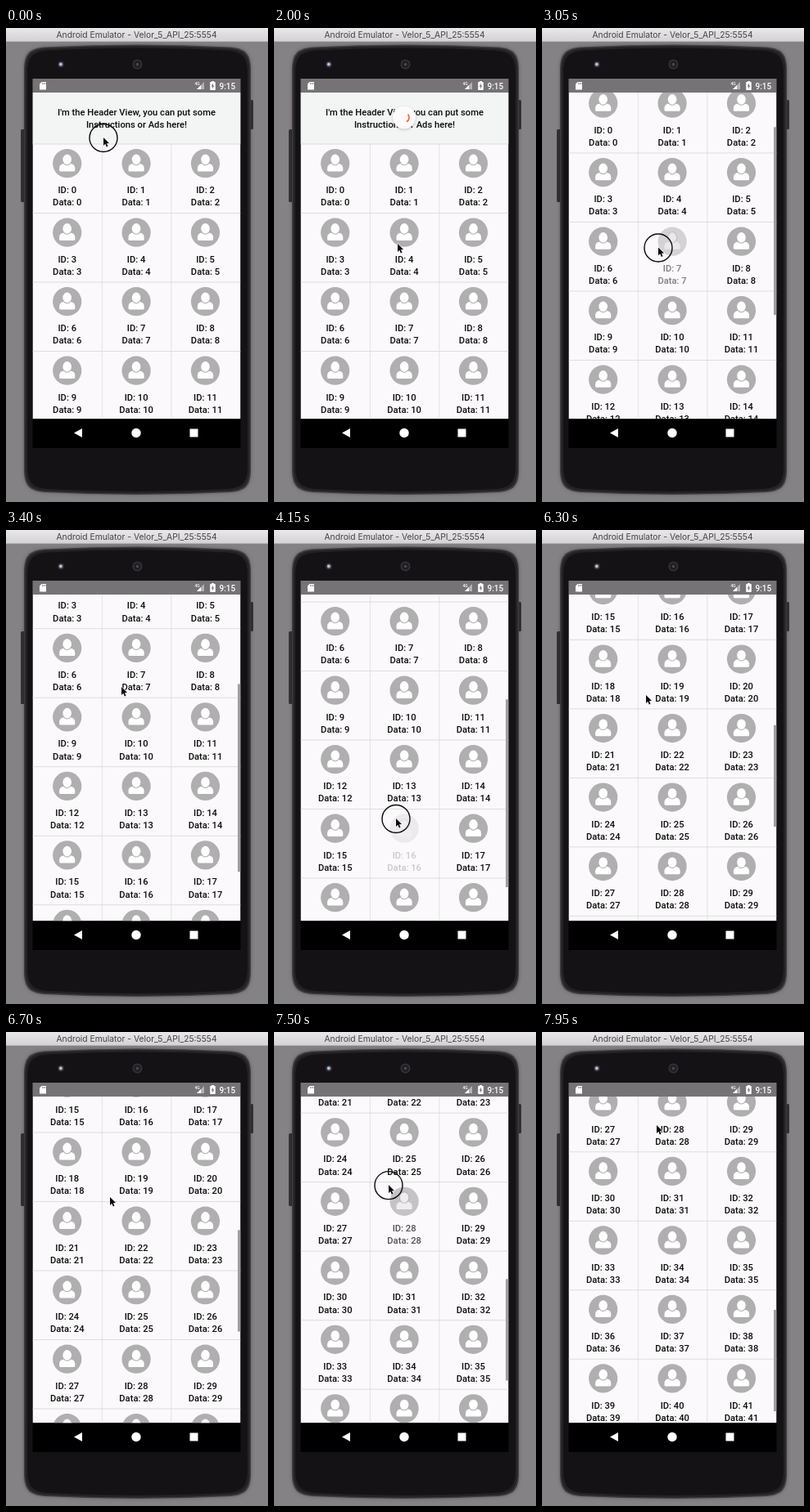
Animation of 320x580 px, one loop 8000 ms. Source, as an HTML page with a canvas:

```html
<!DOCTYPE html>
<html lang="en">
<head>
<meta charset="utf-8">
<title>Grid list demo</title>
<style>
html, body { margin: 0; width: 100%; height: 100%; overflow: hidden; background: #848284; }
canvas { display: block; width: 320px; height: 580px; }
</style>
</head>
<body>
<canvas id="stage"></canvas>
<script>
const W = 320, H = 580, LOOP = 8000;
const LIST = { x: 32.5, y: 79, w: 254, h: 399.5 };
const HEADER = 63, ROW = 84.5, COL = 84.4, FOOTER = 40;
const FONT = '500 11.2px Roboto, sans-serif';
const INK = '#0c0c0c', GREY = '#b0aeb0';
const FLING = 600, TRAVEL = 350, HOVER = 100, SLOP = 100;
const LOADED = 5250;
const REFRESH = { end: 2350, cycle: 1332, colors: ['dimgray', 'tomato', 'limegreen'] };

// Each drag: finger down, start of movement, finger up, and the offset the fling ends at.
const DRAGS = [
  { down: 0, move: 40, up: 430, from: [119, 134], to: [151, 264], rest: 0, pull: true },
  { down: 2750, move: 2850, up: 3260, from: [143, 342], to: [141, 192], rest: 223 },
  { down: 4000, move: 4170, up: 4450, from: [149, 353], to: [146, 283], rest: 293 },
  { down: 5650, move: 5740, up: 6060, from: [136, 382], to: [127, 202], rest: 526 },
  { down: 7170, move: 7240, up: 7600, from: [140, 380], to: [140, 114], rest: 844 }
];
const PULL = DRAGS[0];

const canvas = document.getElementById('stage');
const c = canvas.getContext('2d');
const dpr = window.devicePixelRatio || 1;
canvas.width = W * dpr;
canvas.height = H * dpr;

const TAU = Math.PI * 2;
const clamp = (v, a = 0, b = 1) => Math.min(b, Math.max(a, v));
const mix = (a, b, k) => a + (b - a) * k;
const smooth = k => k * k * (3 - 2 * k);
const out = k => 1 - (1 - k) ** 3;
const span = (t, a, b) => clamp((t - a) / (b - a));
const between = (p, q, k) => [mix(p[0], q[0], k), mix(p[1], q[1], k)];

// Offset at the start of each drag and the item under the finger.
DRAGS.forEach((d, i) => {
  d.base = i ? DRAGS[i - 1].rest : 0;
  const row = Math.floor((d.from[1] - LIST.y - HEADER + d.base) / ROW);
  d.item = row * 3 + Math.floor((d.from[0] - LIST.x) / COL);
});

const lastDrag = t => DRAGS.filter(d => d.down <= t).pop();
const isDown = t => t < lastDrag(t).up;

function pointerAt(t) {
  const d = lastDrag(t);
  const next = DRAGS[DRAGS.indexOf(d) + 1];
  if (t < d.up || !next) return between(d.from, d.to, span(t, d.move, d.up));
  const arrive = next.down - HOVER;
  return between(d.to, next.from, smooth(span(t, arrive - TRAVEL, arrive)));
}

function scrollAt(t) {
  const d = lastDrag(t);
  if (d.pull) return 0;
  const dragged = d.base + (d.from[1] - d.to[1]) * span(t, d.move, d.up);
  return mix(dragged, d.rest, out(span(t, d.up, d.up + FLING)));
}

function itemAlpha(id, t) {
  const d = lastDrag(t);
  if (d.item !== id) return 1;
  const cancel = d.move + SLOP;
  return t < cancel ? mix(1, 0.2, span(t, d.down, d.down + 150)) : mix(0.2, 1, span(t, cancel, cancel + 250));
}

function rect(x, y, w, h, fill) {
  c.fillStyle = fill;
  c.fillRect(x, y, w, h);
}
function round(x, y, w, h, r, fill) {
  c.beginPath();
  c.roundRect(x, y, w, h, r);
  c.fillStyle = fill;
  c.fill();
}
function disc(x, y, r, fill) {
  c.beginPath();
  c.arc(x, y, r, 0, TAU);
  c.fillStyle = fill;
  c.fill();
}
function poly(points, fill) {
  c.beginPath();
  points.forEach(([x, y]) => c.lineTo(x, y));
  c.closePath();
  c.fillStyle = fill;
  c.fill();
}
function arc(x, y, r, start, sweep, width, color) {
  c.beginPath();
  c.arc(x, y, r, start, start + sweep);
  c.lineWidth = width;
  c.strokeStyle = color;
  c.stroke();
}
function text(s, x, y, font, fill, align = 'center') {
  c.font = font;
  c.fillStyle = fill;
  c.textAlign = align;
  c.fillText(s, x, y);
}

// Phone outline with gently bulged top and bottom edges.
function shell(inset, fill) {
  const l = 22 + inset, r = 299 - inset, t = 23.5 + inset, b = 568 - inset;
  c.beginPath();
  c.moveTo(l, t + 29);
  c.bezierCurveTo(l, t + 8, l + 6, t + 2, l + 24, t);
  c.quadraticCurveTo(160.5, t - 6, r - 24, t);
  c.bezierCurveTo(r - 6, t + 2, r, t + 8, r, t + 29);
  c.lineTo(r, b - 29);
  c.bezierCurveTo(r, b - 8, r - 6, b - 2, r - 24, b);
  c.quadraticCurveTo(160.5, b + 6, l + 24, b);
  c.bezierCurveTo(l + 6, b - 2, l, b - 8, l, b - 29);
  c.closePath();
  c.fillStyle = fill;
  c.fill();
}

function drawDevice() {
  rect(0, 0, W, H, '#848284');
  const bar = c.createLinearGradient(0, 0, 0, 17);
  bar.addColorStop(0, '#e9e7e9');
  bar.addColorStop(1, '#d3d1d3');
  rect(0, 0, W, 17, bar);
  rect(0, 16, W, 1, '#b2b0b2');
  text('Android Emulator - Velor_5_API_25:5554', 159.5, 12, '10.3px Inter, sans-serif', '#454345');

  round(18, 124, 5, 89, 1.5, '#343234');
  round(297, 88, 5, 36, 1.5, '#343234');
  c.save();
  c.shadowColor = 'rgba(0,0,0,.3)';
  c.shadowBlur = 4 * dpr;
  shell(0, '#3c3a3c');
  c.restore();
  shell(1.5, '#242224');
  shell(4, '#141214');

  disc(160.5, 44.5, 6, '#353337');
  disc(160.5, 44.5, 4.2, '#1c1b20');
  disc(160.5, 44.5, 2, '#45434c');
  disc(67, 44.5, 4, '#2c2c33');
  disc(67, 44.5, 2.4, '#7d8295');
  disc(66.7, 44.2, 1.5, '#c4c8d6');
}

function drawStatusBar() {
  rect(LIST.x, 62, LIST.w, 17, '#757375');
  poly([[43.5, 66], [49, 66], [49, 75.5], [41, 75.5], [41, 68.5]], '#fff');
  for (let i = 0; i < 3; i++) rect(44 + i * 1.8, 67, 0.8, 2, '#757375');
  text('4G', 230.5, 70, '500 5px Roboto, sans-serif', '#fff', 'left');
  poly([[242, 66], [242, 75], [233, 75]], '#b4b2b4');
  poly([[238, 70], [238, 75], [233, 75]], '#fff');
  rect(251, 65, 3, 2, '#fff');
  round(249.2, 66, 6.6, 10, 0.7, '#fff');
  poly([[253, 67.5], [250.7, 71.6], [252.2, 71.6], [252, 74.6], [254.3, 70.5], [252.8, 70.5]], '#757375');
  text('9:15', 260.5, 74.5, '500 10px Roboto, sans-serif', '#fff', 'left');
}

function drawNavBar() {
  rect(LIST.x, LIST.y + LIST.h, LIST.w, 35.5, '#000');
  poly([[83, 495.5], [93, 490], [93, 501]], '#fff');
  disc(159, 495.5, 5.7, '#fff');
  rect(224.5, 490.5, 10, 10, '#fff');
}

function drawAvatar(x, y) {
  disc(x, y, 17.6, GREY);
  round(x - 9.6, y + 0.3, 19.2, 9.4, [5.5, 5.5, 1.5, 1.5], '#fff');
  c.beginPath();
  c.ellipse(x, y - 4.8, 5.3, 6.3, 0, 0, TAU);
  c.lineWidth = 2;
  c.strokeStyle = GREY;
  c.stroke();
  c.fill();
}

function drawItem(id, x, top, t) {
  c.save();
  c.globalAlpha = itemAlpha(id, t);
  drawAvatar(x, top + 23.7);
  text('ID: ' + id, x, top + 60.3, FONT, INK);
  text('Data: ' + id, x, top + 75.4, FONT, INK);
  c.restore();
}

// Start angle and sweep of a spinner after p cycles.
function spin(p) {
  const turn = Math.floor(p), f = p - turn;
  const head = smooth(clamp(f * 2)), tail = smooth(clamp(f * 2 - 1));
  return [p * 0.6 * TAU + TAU * 0.8 * (tail + turn), 0.3 + TAU * 0.8 * (head - tail)];
}

function drawRefresh(t) {
  const { end, cycle, colors } = REFRESH;
  if (t < PULL.move || t > end + 150) return;
  const drag = span(t, PULL.move, PULL.up);
  const y = mix(mix(65, 128, drag), 109.5, out(span(t, PULL.up, PULL.up + 200)));
  const size = 1 - span(t, end, end + 150);
  c.save();
  c.translate(159, y);
  c.scale(size, size);
  c.save();
  c.shadowColor = 'rgba(0,0,0,.22)';
  c.shadowBlur = 3 * dpr;
  c.shadowOffsetY = dpr;
  disc(0, 0, 14, '#fcfafc');
  c.restore();
  if (t < PULL.up) {
    c.globalAlpha = mix(0.3, 1, drag);
    arc(0, 0, 6, drag * 2 - 1.5, 0.05 + drag * TAU * 0.8, 1.8, colors[0]);
  } else {
    const p = (t - PULL.up) / cycle;
    const [a, sweep] = spin(p);
    arc(0, 0, 6, a - 3.9, sweep, 1.8, colors[Math.floor(p + 0.12) % 3]);
  }
  c.restore();
}

function drawScrollBar(t, offset, content) {
  const d = lastDrag(t);
  if (d.pull) return;
  const idle = d.up + FLING + 300;
  c.save();
  c.globalAlpha = t < d.move ? 0 : 1 - span(t, idle, idle + 250);
  // The bar left from the last fling stays until the new drag moves.
  if (t < d.move) {
    const last = DRAGS[DRAGS.indexOf(d) - 1];
    const lastIdle = last.up + FLING + 300;
    c.globalAlpha = last.pull ? 0 : 1 - span(t, lastIdle, lastIdle + 250);
  }
  rect(283, LIST.y + offset / content * LIST.h, 3.5, LIST.h * LIST.h / content, '#a09ea0');
  c.restore();
}

function drawList(t) {
  const offset = scrollAt(t);
  const rows = t < LOADED ? 7 : 14;
  const top = LIST.y - offset;
  const gridTop = top + HEADER;
  const gridEnd = gridTop + rows * ROW;
  const bottom = LIST.y + LIST.h;
  c.save();
  c.beginPath();
  c.rect(LIST.x, LIST.y, LIST.w, LIST.h);
  c.clip();
  rect(LIST.x, LIST.y, LIST.w, LIST.h, '#fbf9fb');

  rect(LIST.x, top, LIST.w, HEADER, '#f3f4f4');
  text("I'm the Header View, you can put some", 159.5, top + 28.3, FONT, INK);
  text('Instructions or Ads here!', 159.5, top + 43, FONT, INK);

  for (let i = 1; i < 3; i++) rect(LIST.x + i * COL, gridTop, 1, rows * ROW, '#e3e1e3');
  for (let r = 0; r <= rows; r++) {
    const y = gridTop + r * ROW;
    if (y < LIST.y - ROW || y > bottom) continue;
    rect(LIST.x, y - 0.5, LIST.w, 1, '#dedcde');
    if (r === rows) break;
    for (let i = 0; i < 3; i++) drawItem(r * 3 + i, LIST.x + (i + 0.5) * COL, y, t);
  }
  if (gridEnd < bottom) {
    const [a, sweep] = spin(t / REFRESH.cycle);
    arc(159.5, gridEnd + FOOTER / 2, 9, a, sweep, 2, '#8b898b');
  }
  drawScrollBar(t, offset, HEADER + rows * ROW + FOOTER);
  drawRefresh(t);
  c.restore();
}

function drawPointer(t) {
  const [x, y] = pointerAt(t);
  if (isDown(t)) arc(x, y + 0.5, 17, 0, TAU, 1.4, INK);
  c.save();
  c.translate(x, y);
  c.scale(0.9, 0.9);
  const arrow = [[0, 0], [0, 11], [2.5, 8.7], [4.3, 12.8], [6.2, 12], [4.4, 8], [7.8, 7.8]];
  poly(arrow, INK);
  c.lineJoin = 'round';
  c.lineWidth = 1.4;
  c.strokeStyle = '#fff';
  c.stroke();
  c.fill();
  c.restore();
}

function frame(t) {
  c.setTransform(dpr, 0, 0, dpr, 0, 0);
  drawDevice();
  drawList(t);
  drawStatusBar();
  drawNavBar();
  drawPointer(t);
}

const began = performance.now();
function tick() {
  frame((performance.now() - began) % LOOP);
  requestAnimationFrame(tick);
}
tick();
</script>
</body>
</html>
```
